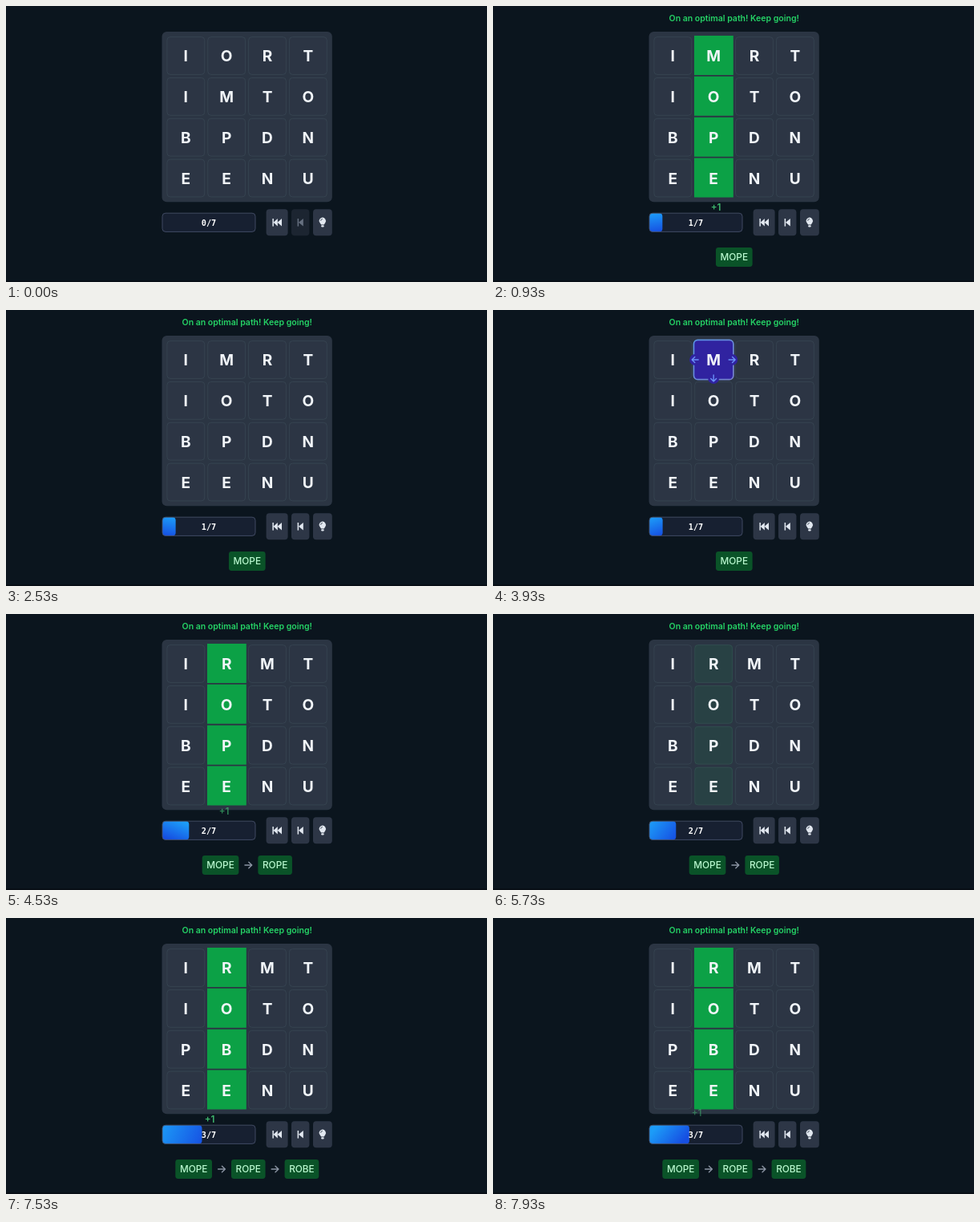
An HTML page with a canvas for the animation above (8000 ms loop, 600x344 px).

```html
<!DOCTYPE html>
<html lang="en">
<head>
<meta charset="utf-8">
<title>Word grid</title>
<style>
  html, body { margin: 0; width: 100%; height: 100%; overflow: hidden; background: #0b151e; }
  canvas { display: block; width: 600px; height: 344px; }
</style>
</head>
<body>
<canvas id="stage"></canvas>
<script>
const LOOP = 8000;
const CELL = 47.6, PITCH = 50.85, LEFT = 200.5, TOP = 38.2;
const START = ['IORT', 'IMTO', 'BPDN', 'EENU'];

// Cells are [column, row]; each move swaps two of them and completes a word in column 1.
const MOVES = [
  { select: 400, swap: 670, from: [1, 0], to: [1, 1], word: 'MOPE', plusX: 278 },
  { select: 3730, swap: 4030, from: [1, 0], to: [2, 0], word: 'ROPE', plusX: 272 },
  { select: 7000, swap: 7280, from: [1, 2], to: [0, 2], word: 'ROBE', plusX: 254 },
];

const canvas = document.getElementById('stage');
const ctx = canvas.getContext('2d');
const ratio = window.devicePixelRatio || 1;
canvas.width = 600 * ratio;
canvas.height = 344 * ratio;

const clamp = v => Math.max(0, Math.min(1, v));
const progress = (t, start, length) => clamp((t - start) / length);
const easeOut = p => 1 - (1 - p) ** 2;
const sans = (weight, size) => `${weight} ${size}px Inter, sans-serif`;
const cellX = col => LEFT + col * PITCH;
const cellY = row => TOP + row * PITCH;

function box(x, y, w, h, radius, fill, stroke, line = 1) {
  ctx.beginPath();
  ctx.roundRect(x, y, w, h, radius);
  if (fill) { ctx.fillStyle = fill; ctx.fill(); }
  if (stroke) { ctx.strokeStyle = stroke; ctx.lineWidth = line; ctx.stroke(); }
}

function text(label, x, baseline, font, color) {
  ctx.font = font;
  ctx.fillStyle = color;
  ctx.textAlign = 'center';
  ctx.fillText(label, x, baseline);
}

function withAlpha(alpha, paint) {
  if (alpha <= 0) return;
  ctx.save();
  ctx.globalAlpha = alpha;
  paint();
  ctx.restore();
}

function arrow(x, y, angle, color, size) {
  ctx.save();
  ctx.translate(x, y);
  ctx.rotate(angle);
  ctx.beginPath();
  ctx.moveTo(-size, 0);
  ctx.lineTo(size, 0);
  ctx.moveTo(size * 0.1, -size * 0.85);
  ctx.lineTo(size, 0);
  ctx.lineTo(size * 0.1, size * 0.85);
  ctx.strokeStyle = color;
  ctx.lineWidth = 1.4;
  ctx.lineCap = ctx.lineJoin = 'round';
  ctx.stroke();
  ctx.restore();
}

function lettersAt(t) {
  const grid = START.map(row => [...row]);
  for (const { swap, from: [a, b], to: [c, d] } of MOVES) {
    if (t >= swap) [grid[b][a], grid[d][c]] = [grid[d][c], grid[b][a]];
  }
  return grid;
}

function drawSelection([col, row]) {
  const x = cellX(col), y = cellY(row), mid = CELL / 2;
  const ring = ctx.createLinearGradient(x, y, x + CELL, y + CELL);
  ring.addColorStop(0, '#5a94e4');
  ring.addColorStop(1, '#7580cc');
  box(x - 0.9, y - 0.9, CELL + 1.8, CELL + 1.8, 5, '#3023a0', ring, 1.7);
  const hints = [[-1, 0], [1, 0], [0, -1], [0, 1]];
  for (const [dx, dy] of hints) {
    if (row + dy < 0) continue;
    const hx = x + mid + dx * 23, hy = y + mid + dy * 23;
    box(hx - 7, hy - 7, 14, 14, 7, '#3023a0');
    arrow(hx, hy, Math.atan2(dy, dx), '#6a92fa', 4);
  }
}

function drawBoard(t) {
  box(194.5, 32, 212.3, 212.3, 6, '#2b3543');
  for (let row = 0; row < 4; row++) {
    for (let col = 0; col < 4; col++) {
      box(cellX(col) + 0.4, cellY(row) + 0.4, CELL - 0.8, CELL - 0.8, 4, '#2c3544', '#384653', 0.85);
    }
  }
  for (const { select, swap, from } of MOVES) {
    const fadeStart = swap + 1500;
    const green = t < swap ? 0 : (1 - progress(t, fadeStart, 300)) ** 2;
    const solid = t < fadeStart;
    withAlpha(green, () => {
      for (let row = 0; row < 4; row++) {
        if (solid) box(251, cellY(row) - 1.2, 48.8, 49, 0, '#0ca146');
        else box(cellX(1), cellY(row), CELL, CELL, 4, '#0ca146');
      }
    });
    const shown = t < swap ? progress(t, select - 40, 150) : 0;
    withAlpha(shown, () => drawSelection(from));
  }
  lettersAt(t).forEach((letters, row) => letters.forEach((letter, col) =>
    text(letter, cellX(col) + CELL / 2, cellY(row) + 30.8, sans(700, 19.1), '#f1f5f9')));
}

function drawProgress(t, done) {
  box(195, 258.2, 116, 23.2, 4, '#172031');
  const last = MOVES[done - 1];
  const steps = last ? done - 1 + easeOut(progress(t, last.swap, 300)) : 0;
  if (steps > 0) {
    const width = 116.5 * steps / 7;
    const drift = Math.sin(t / 2000 * Math.PI * 2) * width * 0.35;
    const fill = ctx.createLinearGradient(195 + width * 0.3 + drift, 258, 195 + width * 0.7 - drift, 282);
    fill.addColorStop(0, '#1c9cf8');
    fill.addColorStop(1, '#164fe2');
    box(195, 258.2, width, 23.2, 4, fill);
  }
  box(195, 258.2, 116, 23.2, 4, null, '#465069', 0.9);
  text(`${done}/7`, 253, 273.7, 'bold 10.2px "DejaVu Sans Mono", monospace', '#ffffff');
}

function backTriangle(x, width) {
  ctx.beginPath();
  ctx.moveTo(x, 269.8);
  ctx.lineTo(x + width, 265);
  ctx.lineTo(x + width, 274.6);
  ctx.closePath();
  ctx.fill();
}

function drawButtons(canUndo) {
  const face = '#2d3646', icon = '#e2e8f0';
  box(324.6, 253.2, 27, 33, 4, face);
  ctx.fillStyle = icon;
  ctx.fillRect(332.4, 265, 1.5, 9.6);
  backTriangle(333.6, 5.2);
  backTriangle(338.6, 5.4);

  box(356, 253.2, 22.4, 33, 4, canUndo ? face : '#1c2531');
  ctx.fillStyle = canUndo ? icon : '#667080';
  ctx.fillRect(363.6, 265, 1.5, 9.6);
  backTriangle(365, 5.8);

  box(383, 253.2, 23.8, 33, 4, face);
  ctx.fillStyle = icon;
  ctx.beginPath();
  ctx.arc(394.9, 267.8, 4.1, Math.PI * 0.8, Math.PI * 0.2);
  ctx.lineTo(396.7, 272.6);
  ctx.lineTo(393.1, 272.6);
  ctx.fill();
  box(393.1, 273.2, 3.6, 2.3, 1, icon);
  ctx.beginPath();
  ctx.arc(394.9, 267.8, 2.3, Math.PI, Math.PI * 1.5);
  ctx.strokeStyle = face;
  ctx.lineWidth = 0.8;
  ctx.stroke();
}

function drawWords(t, found) {
  const gap = 24, font = sans(500, 11.8);
  ctx.font = font;
  const widths = found.map(move => ctx.measureText(move.word).width + 11.2);
  const total = widths.reduce((sum, w) => sum + w, gap * (found.length - 1));
  let x = 300.8 - total / 2;
  found.forEach(({ word, swap }, i) => {
    const width = widths[i];
    withAlpha(progress(t, swap - 60, 260), () => {
      if (i) arrow(x - gap / 2, 313, 0, '#8b94a3', 4.4);
      box(x, 301, width, 24, 3.4, '#0a5328');
      text(word, x + width / 2, 317.3, font, '#b9f8cf');
    });
    x += width + gap;
  });
}

function drawPlusOnes(t) {
  for (const { swap, plusX } of MOVES) {
    if (t < swap + 60) continue;
    const p = progress(t, swap + 60, 1000);
    withAlpha(1 - p, () => text('+1', plusX, 259 - 20 * p, sans(600, 11.6), '#4ade80'));
  }
}

function draw(t) {
  ctx.setTransform(ratio, 0, 0, ratio, 0, 0);
  ctx.fillStyle = '#0b151e';
  ctx.fillRect(0, 0, 600, 344);
  ctx.fillStyle = '#080f16';
  ctx.fillRect(0, 342, 600, 2);
  const found = MOVES.filter(move => t >= move.swap);
  drawBoard(t);
  drawProgress(t, found.length);
  drawButtons(found.length > 0);
  if (found.length) {
    text('On an optimal path! Keep going!', 300.7, 19.3, sans(600, 10.53), '#25d366');
    drawWords(t, found);
  }
  drawPlusOnes(t);
}

const began = performance.now();
function frame() {
  draw((performance.now() - began) % LOOP);
  requestAnimationFrame(frame);
}
frame();
</script>
</body>
</html>
```
